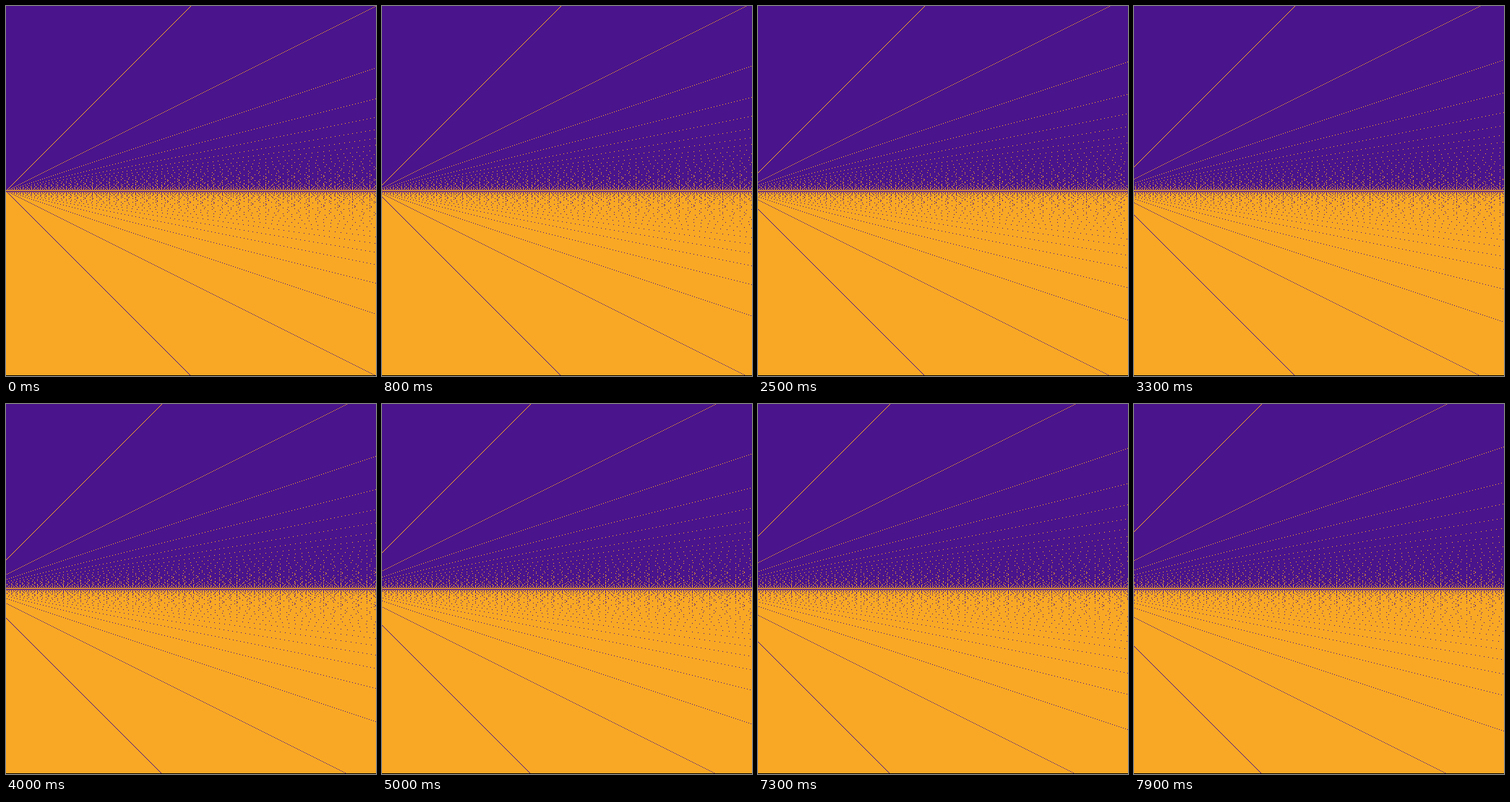
An HTML page with a canvas for the animation above (8000 ms loop, 512 px wide and 512 px high).

```html
<!DOCTYPE html>
<html>
<head>
<meta charset="utf-8">
<title>Divisor fan</title>
<style>
html, body { margin: 0; width: 100%; height: 100%; overflow: hidden; background: #000; }
canvas { display: block; width: 100%; height: 100%; image-rendering: pixelated; }
</style>
</head>
<body>
<canvas id="stage" width="512" height="512"></canvas>
<script>
const SIZE = 512, MID = SIZE / 2, STEP = 100, STEPS = 80;
const ctx = document.getElementById('stage').getContext('2d');
const image = ctx.createImageData(SIZE, SIZE);
const pixels = new Uint32Array(image.data.buffer);

// 0xRRGGBB to the little-endian ABGR word of the pixel buffer
const color = rgb =>
  (0xff000000 | (rgb & 255) << 16 | (rgb & 0xff00) | rgb >> 16) >>> 0;

const BLACK = color(0x000000);
const PURPLE = color(0x4a148c);
const ORANGE = color(0xf9a825);

// Each row swaps its colour at the multiples of its distance from the middle.
function draw(step) {
  pixels.fill(BLACK);
  for (let y = 0; y < SIZE - 1; y++) {
    const top = y < MID;
    const d = top ? MID - y : y - MID + 1;
    const [back, mark] = top ? [PURPLE, ORANGE] : [ORANGE, PURPLE];
    const row = y * SIZE;
    pixels.fill(back, row, row + SIZE);
    for (let n = d * (Math.floor(step / d) + 1); n <= step + SIZE; n += d) {
      pixels[row + n - step - 1] = mark;
    }
  }
  ctx.putImageData(image, 0, 0);
}

let shown = 0;
const start = performance.now();
function tick() {
  const elapsed = Math.max(0, performance.now() - start);
  const step = Math.floor(elapsed / STEP) % STEPS;
  if (step !== shown) draw(shown = step);
  requestAnimationFrame(tick);
}
draw(0);
tick();
</script>
</body>
</html>
```
